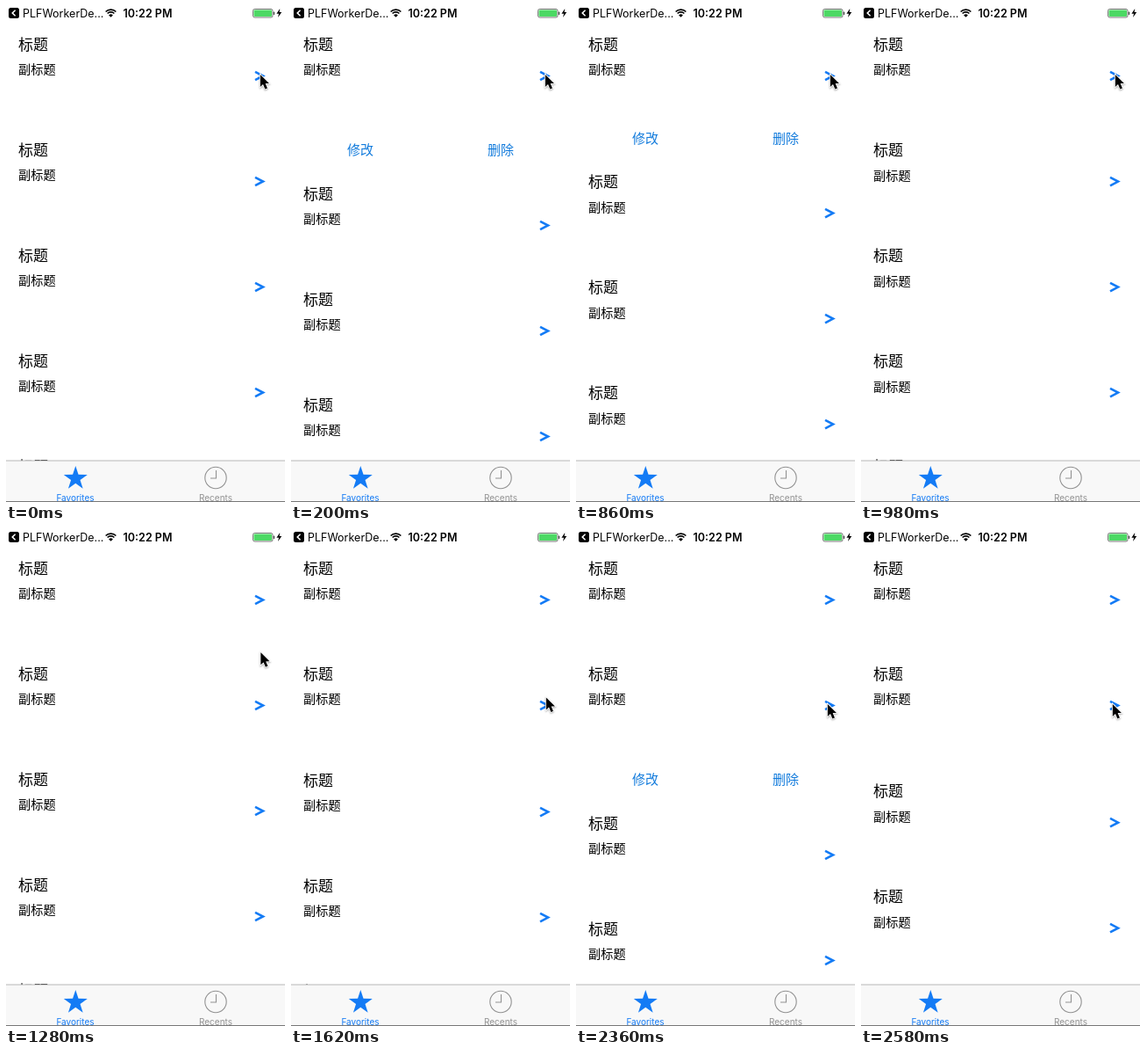
These frames come from a looping animation (318 by 564 pixels, 2600 ms). An HTML page with a canvas:

```html
<!DOCTYPE html>
<html lang="zh">
<head>
<meta charset="utf-8">
<title>Expandable list</title>
<style>
  html, body { margin: 0; width: 100%; height: 100%; overflow: hidden; background: #fff; }
  canvas { display: block; width: 318px; height: 564px; }
</style>
</head>
<body>
<canvas id="stage"></canvas>
<script>
const W = 318, H = 564, LOOP = 2600;
const ROW_TOP = 20, ROW_H = 120, DRAWER = 50, SLIDE = 200;
const BLUE = '#147bf5', GREY = '#929292';
const CJK = '"Noto Sans CJK SC", "Noto Sans CJK", sans-serif';
const LATIN = 'Inter, sans-serif';

const canvas = document.getElementById('stage');
const ctx = canvas.getContext('2d');
const scale = window.devicePixelRatio || 1;
canvas.width = W * scale;
canvas.height = H * scale;

const drawers = [
  { row: 0, open: 3, close: 788 },
  { row: 1, open: 1600, close: 2452 }
];

// Pointer stops: time, x, y
const pointerPath = [
  [0, 289.3, 77.5], [1060, 289.3, 77.5], [1480, 290.3, 190],
  [1640, 290.3, 190], [1840, 290.3, 192], [1960, 290.3, 192], [2140, 286.3, 197.5]
];

const clamp = v => Math.min(1, Math.max(0, v));

// cubic-bezier(.42, 0, .58, 1)
function ease(x) {
  if (x <= 0 || x >= 1) return clamp(x);
  let lo = 0, hi = 1;
  for (let i = 0; i < 24; i++) {
    const u = (lo + hi) / 2, v = 1 - u;
    if (1.26 * v * v * u + 1.74 * v * u * u + u * u * u < x) lo = u; else hi = u;
  }
  return lo * lo * (3 - 2 * lo);
}

function pointerAt(t) {
  for (let i = 1; i < pointerPath.length; i++) {
    const [t0, x0, y0] = pointerPath[i - 1], [t1, x1, y1] = pointerPath[i];
    if (t < t1) {
      const k = ease((t - t0) / (t1 - t0));
      return [x0 + (x1 - x0) * k, y0 + (y1 - y0) * k];
    }
  }
  return pointerPath[pointerPath.length - 1].slice(1);
}

function text(str, x, y, font, color = '#000', align = 'left') {
  ctx.font = font;
  ctx.fillStyle = color;
  ctx.textAlign = align;
  ctx.fillText(str, x, y);
}

function path(points, close = false) {
  ctx.beginPath();
  points.forEach(([x, y]) => ctx.lineTo(x, y));
  if (close) ctx.closePath();
}

function stroke(color, width) {
  ctx.strokeStyle = color;
  ctx.lineWidth = width;
  ctx.stroke();
}

function fill(color) {
  ctx.fillStyle = color;
  ctx.fill();
}

function roundRect(x, y, w, h, r) {
  ctx.beginPath();
  ctx.roundRect(x, y, w, h, r);
}

function drawStatusBar() {
  roundRect(3, 2, 12, 12, 2.5);
  fill('#000');
  path([[10.6, 4.8], [7.3, 8], [10.6, 11.2]]);
  stroke('#fff', 1.6);
  text('PLFWorkerDe...', 19, 12.6, '12.5px ' + LATIN);

  for (const r of [8.3, 5.5]) {
    ctx.beginPath();
    ctx.arc(119.5, 12.4, r, -Math.PI * 0.75, -Math.PI * 0.25);
    stroke('#000', 1.6);
  }
  ctx.beginPath();
  ctx.moveTo(119.5, 12.8);
  ctx.arc(119.5, 12.8, 3.4, -Math.PI * 0.75, -Math.PI * 0.25);
  fill('#000');

  text('10:22 PM', 161.5, 12.8, '600 12.5px ' + LATIN, '#000', 'center');

  roundRect(281.5, 3.5, 22.5, 9.5, 2);
  stroke('#555', 0.8);
  roundRect(282.5, 4.5, 20.5, 7.5, 1);
  fill('#4cd964');
  roundRect(304.7, 6.5, 1.5, 3.6, 0.7);
  fill('#555');
  path([[312.2, 3], [308.4, 8.8], [311, 8.8], [310, 13], [314.2, 7.1], [311.6, 7.1]], true);
  fill('#000');
}

function drawRow(y) {
  text('标题', 14, y + 30, '17px ' + CJK);
  text('副标题', 14, y + 57.4, '14.2px ' + CJK);
  path([[284, y + 54.8], [293, y + 59.5], [284, y + 64.2]]);
  stroke(BLUE, 2.6);
}

function drawDrawer(row, height, closing) {
  const top = ROW_TOP + ROW_H * (row + 1);
  const base = top + 29.4 + (closing ? height - DRAWER : 0);
  ctx.save();
  ctx.beginPath();
  ctx.rect(0, top, W, height);
  ctx.clip();
  text('修改', 79, base, '15px ' + CJK, '#127bdc', 'center');
  text('删除', 239, base, '15px ' + CJK, '#127bdc', 'center');
  ctx.restore();
}

function drawList(t) {
  const heights = drawers.map(d =>
    DRAWER * (ease((t - d.open) / SLIDE) - ease((t - d.close) / SLIDE)));
  for (let i = 0; i < 5; i++) {
    const shift = heights.reduce((sum, h, k) => sum + (i > drawers[k].row ? h : 0), 0);
    drawRow(ROW_TOP + i * ROW_H + shift);
  }
  drawers.forEach((d, k) => {
    if (heights[k] > 0) drawDrawer(d.row, heights[k], t > d.close);
  });
}

function drawTabBar() {
  ctx.fillStyle = '#f8f8f8';
  ctx.fillRect(0, 517, W, 47);
  ctx.fillStyle = '#b8b8b8';
  ctx.fillRect(0, 516.5, W, 1);

  const star = Array.from({ length: 10 }, (_, i) => {
    const a = -Math.PI / 2 + i * Math.PI / 5, r = i % 2 ? 5.5 : 14.2;
    return [79.3 + r * Math.cos(a), 537.3 + r * Math.sin(a)];
  });
  path(star, true);
  fill(BLUE);

  ctx.beginPath();
  ctx.arc(239, 536.5, 12.2, 0, Math.PI * 2);
  stroke(GREY, 1.1);
  path([[239.5, 528], [239.5, 537], [233, 537]]);
  stroke(GREY, 1.1);

  text('Favorites', 79, 563, '10px ' + LATIN, BLUE, 'center');
  text('Recents', 239, 563, '10px ' + LATIN, GREY, 'center');
  ctx.fillStyle = '#777';
  ctx.fillRect(0, 563, W, 1);
}

function drawPointer([x, y]) {
  ctx.save();
  ctx.translate(x, y);
  path([[0.5, 0.5], [0.5, 14.5], [3.7, 11.6], [6, 17], [8.6, 15.9], [6.3, 10.6], [10.6, 10.4]], true);
  ctx.shadowColor = 'rgba(0,0,0,.35)';
  ctx.shadowBlur = 2 * scale;
  ctx.shadowOffsetY = scale;
  stroke('#fff', 1.6);
  ctx.shadowColor = 'transparent';
  fill('#000');
  ctx.restore();
}

function render(now) {
  const t = now % LOOP;
  ctx.setTransform(scale, 0, 0, scale, 0, 0);
  ctx.fillStyle = '#fff';
  ctx.fillRect(0, 0, W, H);
  drawList(t);
  drawTabBar();
  drawStatusBar();
  drawPointer(pointerAt(t));
  requestAnimationFrame(render);
}

requestAnimationFrame(render);
</script>
</body>
</html>
```
